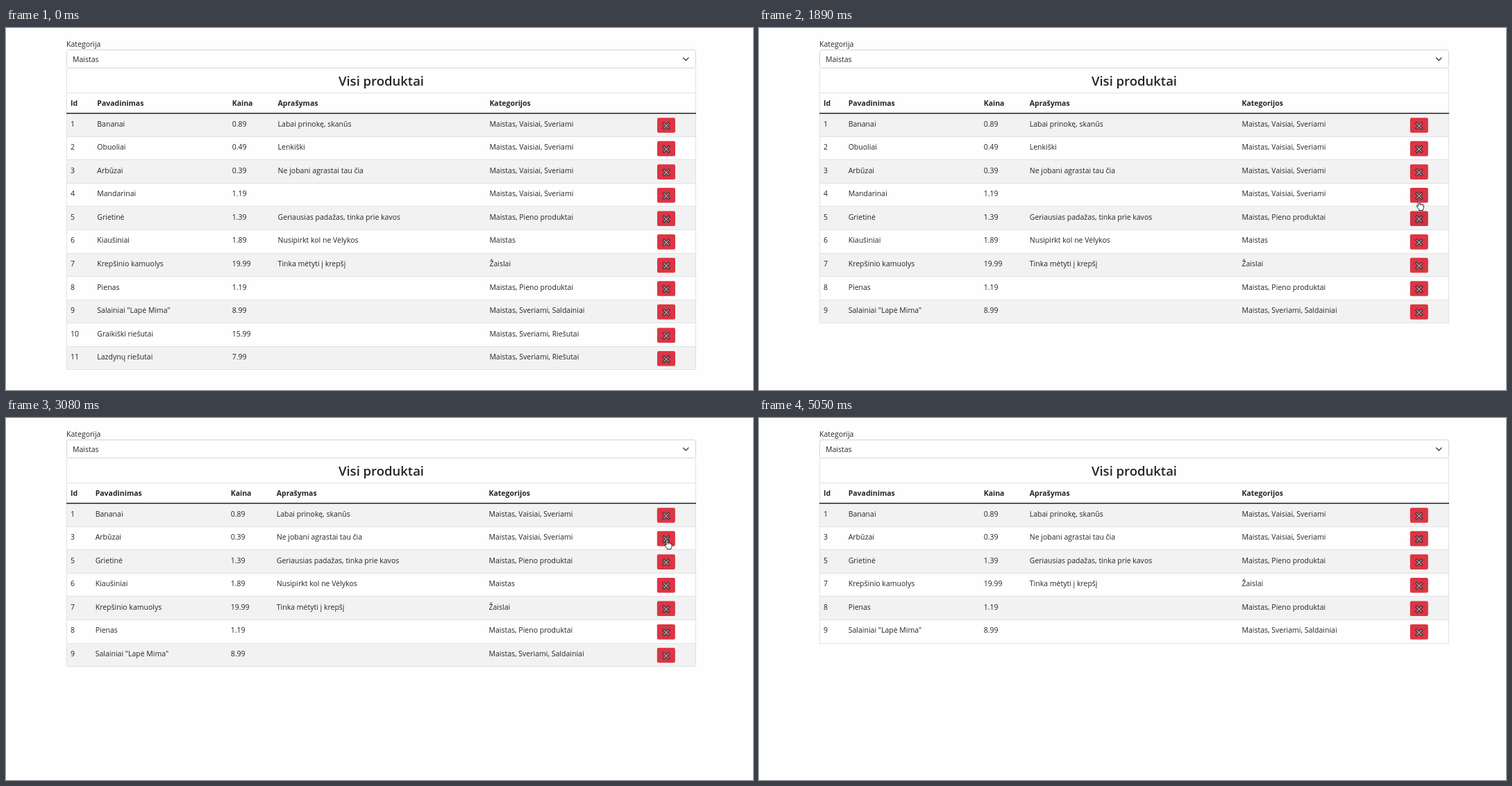
An HTML page for the animation above (5720 ms loop, 1076 px wide and 521 px high).

```html
<!DOCTYPE html>
<html lang="lt">
<head>
<meta charset="utf-8">
<title>Visi produktai</title>
<style>
html, body { margin: 0; width: 100%; height: 100%; overflow: hidden; background: #fefefe; }
svg { display: block; width: 1076px; height: 521px; }
text { font: 10.5px "Open Sans", "Noto Sans", sans-serif; fill: #212529; }
.head { font-weight: 700; }
.title { font-size: 18.5px; font-weight: 600; text-anchor: middle; }
</style>
</head>
<body>
<svg id="stage" viewBox="0 0 1076 521"></svg>
<script>
const LOOP = 5720, TOP = 122.6, PITCH = 33.58;
const LEFT = 87, WIDTH = 907, RIGHT = LEFT + WIDTH, LINE = "#dee2e6";
const BUTTON_W = 26, BUTTON_H = 21.6;
const HEADS = ["Id", "Pavadinimas", "Kaina", "Aprašymas", "Kategorijos"];
const FRUIT = "Maistas, Vaisiai, Sveriami", MILK = "Maistas, Pieno produktai";
const NUTS = "Maistas, Sveriami, Riešutai";
const PRODUCTS = [
  ["Bananai", "0.89", "Labai prinokę, skanūs", FRUIT],
  ["Obuoliai", "0.49", "Lenkiški", FRUIT],
  ["Arbūzai", "0.39", "Ne jobani agrastai tau čia", FRUIT],
  ["Mandarinai", "1.19", "", FRUIT],
  ["Grietinė", "1.39", "Geriausias padažas, tinka prie kavos", MILK],
  ["Kiaušiniai", "1.89", "Nusipirkt kol ne Vėlykos", "Maistas"],
  ["Krepšinio kamuolys", "19.99", "Tinka mėtyti į krepšį", "Žaislai"],
  ["Pienas", "1.19", "", MILK],
  ['Salainiai "Lapė Mima"', "8.99", "", "Maistas, Sveriami, Saldainiai"],
  ["Graikiški riešutai", "15.99", "", NUTS],
  ["Lazdynų riešutai", "7.99", "", NUTS]
];
// five text columns and the button; they move left once all ids have one digit
const WIDE = [93, 131.3, 325.7, 391.6, 696.4, 938];
const NARROW = WIDE.map((x, c) => c ? x - 2.6 * (RIGHT - x) / (RIGHT - WIDE[1]) : x);
// product id: time it is deleted
const REMOVED = { 11: 1000, 10: 1470, 4: 2230, 2: 3080, 6: 3970 };
// pointer moves: start, end, x, y
const ENTRY = [1070, 524];
const MOVES = [
  [0, 800, 950, 474], [1000, 1270, 949.5, 442], [1470, 1870, 950.5, 248],
  [2280, 2780, 951.5, 184], [2800, 2900, 952, 174], [3080, 3440, 956, 240],
  [4040, 4380, 1080, 428], [4580, 4660, 1068, 502], [4720, 4790, 1078, 524],
  [4910, 4985, 1060, 514], [4990, 5050, 1074, 525]
];

const stage = document.getElementById("stage");

function add(parent, tag, attrs, content) {
  const el = document.createElementNS("http://www.w3.org/2000/svg", tag);
  for (const key in attrs) el.setAttribute(key, attrs[key]);
  if (content) el.textContent = content;
  parent.appendChild(el);
  return el;
}
const label = (parent, x, y, content, cls = "") => add(parent, "text", { x, y, class: cls }, content);
const box = (parent, x, y, width, height, fill) => add(parent, "rect", { x, y, width, height, fill });
const show = (el, on) => el.setAttribute("display", on ? "inline" : "none");

label(stage, 87, 27, "Kategorija");
add(stage, "rect", { x: 87.5, y: 31.5, width: 906, height: 26, rx: 3, fill: "#fff", stroke: "#ced4da" });
label(stage, 96, 49, "Maistas");
add(stage, "path", { d: "M975.6 43l3.7 3.7 3.7-3.7", fill: "none", stroke: "#343a40",
  "stroke-width": 1.3, "stroke-linecap": "round", "stroke-linejoin": "round" });
label(stage, 540.5, 83, "Visi produktai", "title");
box(stage, LEFT, 93, WIDTH, 1, LINE);
const heads = HEADS.map(h => label(stage, 0, 112, h, "head"));

const rows = PRODUCTS.map((product, i) => {
  const g = add(stage, "g", {});
  const stripe = box(g, LEFT, 0, WIDTH, 0, "#f2f2f2");
  const line = box(g, LEFT, 0, WIDTH, 1, LINE);
  const cells = [String(i + 1), ...product].map(s => label(g, 0, 0, s));
  const button = add(g, "g", {});
  const face = add(button, "rect", { width: BUTTON_W, height: BUTTON_H, rx: 2.2 });
  const cross = { d: "M9.6 8.2l6.8 6.8m0-6.8l-6.8 6.8", fill: "none", "stroke-linecap": "square" };
  add(button, "path", { ...cross, stroke: "#2b2427", "stroke-width": 3.4 });
  add(button, "path", { ...cross, stroke: "#aaa2a4", "stroke-width": 1.5 });
  return { id: i + 1, g, stripe, line, cells, button, face };
});
const sides = [LEFT, RIGHT - 1].map(x => box(stage, x, 58, 1, 0, LINE));
box(stage, LEFT, 122, WIDTH, 1.5, "#212529");

const ink = { fill: "#fff", stroke: "#111", "stroke-width": 0.9, "stroke-linejoin": "round" };
const arrow = add(stage, "path", { ...ink, d: "M.3.3V11l2.5-2.3 1.7 3.8 1.6-.7-1.7-3.7h3.4z" });
const hand = add(stage, "g", {});
add(hand, "path", { ...ink, d: "M-1 1.2Q0-.6 1.1 1.2V5.2Q2.3 4.4 3.1 5.6 4.4 4.9 5.2 6.2 7 5.8 7 7.6" +
  "V10.3Q6.8 12 5.9 13V14.5H.4V13.3Q-1.2 11.6-3 8.7-3.4 7.2-2.1 7.4L-1 8.6z" });
add(hand, "path", { d: "M1.1 5v2.4m2-1.6v1.8m2.1-1.3v1.5", fill: "none", stroke: "#111", "stroke-width": 0.7 });

const clamp = v => Math.max(0, Math.min(1, v));
const mix = (a, b, k) => a + (b - a) * k;
const easeOut = k => 1 - (1 - k) ** 2;
const rowTop = i => Math.floor(TOP + PITCH * i);
const buttonTop = i => 129.2 + PITCH * i;
const aliveAt = t => rows.filter(row => t < (REMOVED[row.id] || LOOP));
const columnsAt = t => t < REMOVED[10] ? WIDE : NARROW;

function pointerAt(t) {
  return MOVES.reduce(([px, py], [from, to, x, y]) => {
    const k = easeOut(clamp((t - from) / (to - from)));
    return [mix(px, x, k), mix(py, y, k)];
  }, ENTRY);
}

// the row whose button lies under the pointer
function hoveredAt(t) {
  const [x, y] = pointerAt(t), dx = x - columnsAt(t)[5];
  return aliveAt(t).find((row, i) =>
    dx >= 0 && dx <= BUTTON_W && y >= buttonTop(i) && y <= buttonTop(i) + BUTTON_H);
}

function drawRow(row, i, cols, shade) {
  const top = rowTop(i), bottom = rowTop(i + 1);
  show(row.stripe, i % 2 === 0);
  row.stripe.setAttribute("y", top + 1);
  row.stripe.setAttribute("height", bottom - top - 1);
  row.line.setAttribute("y", bottom);
  row.cells.forEach((cell, c) => {
    cell.setAttribute("x", cols[c]);
    cell.setAttribute("y", Math.floor(142 + PITCH * i));
  });
  row.button.setAttribute("transform", `translate(${cols[5]} ${buttonTop(i)})`);
  row.face.setAttribute("fill", `rgb(${mix(220, 187, shade)},${mix(53, 45, shade)},${mix(69, 59, shade)})`);
}

function render(t) {
  const cols = columnsAt(t), alive = aliveAt(t);
  // a button darkens by how long it was hovered in the last moments
  const recent = [60, 90, 120, 150, 180].map(ago => hoveredAt(Math.max(0, t - ago)));
  heads.forEach((h, c) => h.setAttribute("x", cols[c]));
  rows.forEach(row => show(row.g, alive.includes(row)));
  alive.forEach((row, i) =>
    drawRow(row, i, cols, recent.filter(r => r === row).length / recent.length));
  sides.forEach(s => s.setAttribute("height", rowTop(alive.length) + 1 - 58));

  const over = Boolean(hoveredAt(t));
  show(arrow, !over);
  show(hand, over);
  (over ? hand : arrow).setAttribute("transform", `translate(${pointerAt(t)})`);
}

const start = performance.now();
function tick() {
  render((performance.now() - start) % LOOP);
  requestAnimationFrame(tick);
}
tick();
</script>
</body>
</html>
```
